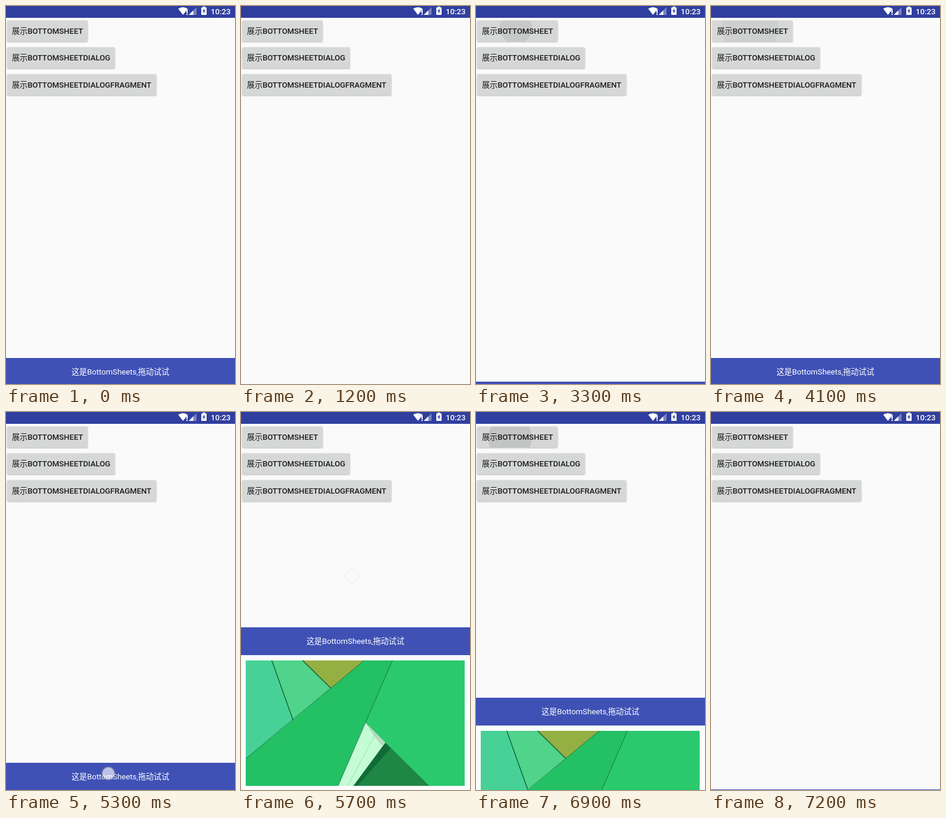
These frames come from a looping animation (387x639 px, 8 s). An HTML page:

```html
<!DOCTYPE html>
<html lang="zh-CN">
<head>
<meta charset="utf-8">
<style>
html, body { margin: 0; width: 100%; height: 100%; overflow: hidden; background: #fafafa; }
svg { display: block; }
text { font: 13.2px Roboto, "Noto Sans CJK SC", "Noto Sans CJK", sans-serif; }
.caps { font-weight: 500; }
.button rect { fill: #d6d7d7; filter: drop-shadow(0 1px 1px rgba(0, 0, 0, .28)); }
.button text { fill: #1c1c1e; }
</style>
</head>
<body>
<svg width="387" height="639" viewBox="0 0 387 639">
  <clipPath id="buttonClip"><rect x="2" y="24.5" width="136" height="35.5" rx="2"/></clipPath>
  <rect width="387" height="639" fill="#fafafa"/>

  <g class="button">
    <rect x="2" y="24.5" width="136" height="35.5" rx="2"/>
    <circle id="ripple" clip-path="url(#buttonClip)"/>
    <text x="10" y="47">展示<tspan class="caps">BOTTOMSHEET</tspan></text>
  </g>
  <g class="button">
    <rect x="2" y="69.8" width="182" height="35.5" rx="2"/>
    <text x="10" y="92.4">展示<tspan class="caps">BOTTOMSHEETDIALOG</tspan></text>
  </g>
  <g class="button">
    <rect x="2" y="115.2" width="252" height="35.5" rx="2"/>
    <text x="10" y="137.7">展示<tspan class="caps">BOTTOMSHEETDIALOGFRAGMENT</tspan></text>
  </g>

  <g id="sheet">
    <rect width="387" height="275" fill="#fcfcfc"/>
    <rect width="387" height="47" fill="#3f51b5"/>
    <text x="193.3" y="28" text-anchor="middle" fill="#fff">这是BottomSheets,拖动试试</text>
    <g transform="translate(8 56)">
      <rect width="370" height="212" fill="#23c064"/>
      <path d="M0 0H44L80 101L0 166Z" fill="#48d197"/>
      <path d="M44 0H96L144 47L80 101Z" fill="#50d38a"/>
      <path d="M96 0H200L144 47Z" fill="#94b043"/>
      <path d="M248 0H370V212H310L202 105Z" fill="#2bc96e"/>
      <path d="M202 105L156 212H182L236 139Z" fill="#c4fcd6"/>
      <path d="M202 105L236 139L231 145L217 128Z" fill="#b9d9bd"/>
      <path d="M236 139L310 212H182Z" fill="#126b36"/>
      <path d="M245 148L310 212H188Z" fill="#1f8745"/>
      <g fill="none" stroke="#0e6136">
        <path d="M44 0L80 101M96 0L144 47" stroke-width="1.4"/>
        <path d="M200 0L0 166M248 0L156 212M245 148L188 212" stroke-width=".8"/>
        <path d="M220 123L172 212" stroke="#94cfa7" stroke-width=".8"/>
      </g>
    </g>
  </g>

  <rect width="387" height="20" fill="#303f9f"/>
  <g fill="#fff">
    <path d="M291 4.5Q299 -.5 307 4.5L304 8.5V9L299 15Z"/>
    <path d="M305 6h2v6h-2zM305 13h2v2h-2z"/>
    <path d="M322 2V15H309Z" opacity=".35"/>
    <path d="M316.5 7.5V15H309Z"/>
    <path d="M330 2.5H332.5V1H336.5V2.5H339V15H330Z"/>
    <path d="M335.5 4L332 9H334.2L333.6 13L337 7.7H335Z" fill="#303f9f"/>
    <text class="caps" x="346" y="14">10:23</text>
  </g>

  <circle id="touch" r="10.7" fill="#fff" fill-opacity=".65" stroke="#84859c" stroke-opacity=".5" stroke-width="2"/>
</svg>
<script>
const LOOP = 8000, STEP = 100;
const OPEN = 364, PEEK = 595, HIDDEN = 639;
const DRAG = 5300, LIFT = 5700;

// spread: ripple radius when the finger lifts
const taps = [
  { down: 700, up: 890, x: 65.5, y: 36.5, spread: 5, from: PEEK, to: HIDDEN },
  { down: 1700, up: 1888, x: 66, y: 37, spread: 5, from: HIDDEN, to: PEEK },
  { down: 3000, up: 3187, x: 67.5, y: 37, spread: 5, from: PEEK, to: HIDDEN },
  { down: 3600, up: 3888, x: 66, y: 37, spread: 5, from: HIDDEN, to: PEEK },
  { down: 6700, up: 6845, x: 57.5, y: 44, spread: 26, from: OPEN, to: HIDDEN },
];

const [sheet, touch, ripple] = ['sheet', 'touch', 'ripple'].map(id => document.getElementById(id));

function set(el, attrs) {
  for (const name in attrs) el.setAttribute(name, attrs[name]);
}

// Quintic settle whose duration grows with the distance
function settle({ up, from, to }, t) {
  const duration = 256 * (1 + Math.abs(to - from) / (HIDDEN - OPEN));
  const left = 1 - Math.min(1, (t - up) / duration);
  return Math.round(to + (from - to) * left ** 5);
}

function finger(t) {
  const left = (1 - Math.min(1, (t - DRAG) / 300)) ** 2.4;
  return { x: 188 - 15 * left, y: 277 + 334 * left };
}

function draw(t) {
  const tap = taps.findLast(tap => t >= tap.down);
  const lifted = taps.findLast(tap => t >= tap.up);
  const dragged = t >= DRAG && t < taps.at(-1).down;

  let top = lifted ? settle(lifted, t) : PEEK;
  if (t >= DRAG && t < taps.at(-1).up) top = Math.max(OPEN, finger(t).y - 18);
  set(sheet, { transform: `translate(0 ${top})` });

  const point = dragged ? finger(t) : tap;
  const pressed = dragged ? t < LIFT : tap && t < tap.up;
  set(touch, {
    cx: point ? point.x : 0,
    cy: point ? point.y : 0,
    opacity: pressed ? 1 : dragged ? .12 : 0,
  });

  const age = lifted ? t - lifted.up : Infinity;
  if (age < 310) {
    set(ripple, {
      cx: lifted.x, cy: lifted.y,
      r: lifted.spread + age * .2,
      opacity: .11 * (1 - age / 310),
    });
  } else set(ripple, { opacity: 0 });
}

function tick() {
  const t = performance.now() % LOOP;
  draw(t - t % STEP);
  requestAnimationFrame(tick);
}
tick();
</script>
</body>
</html>
```
